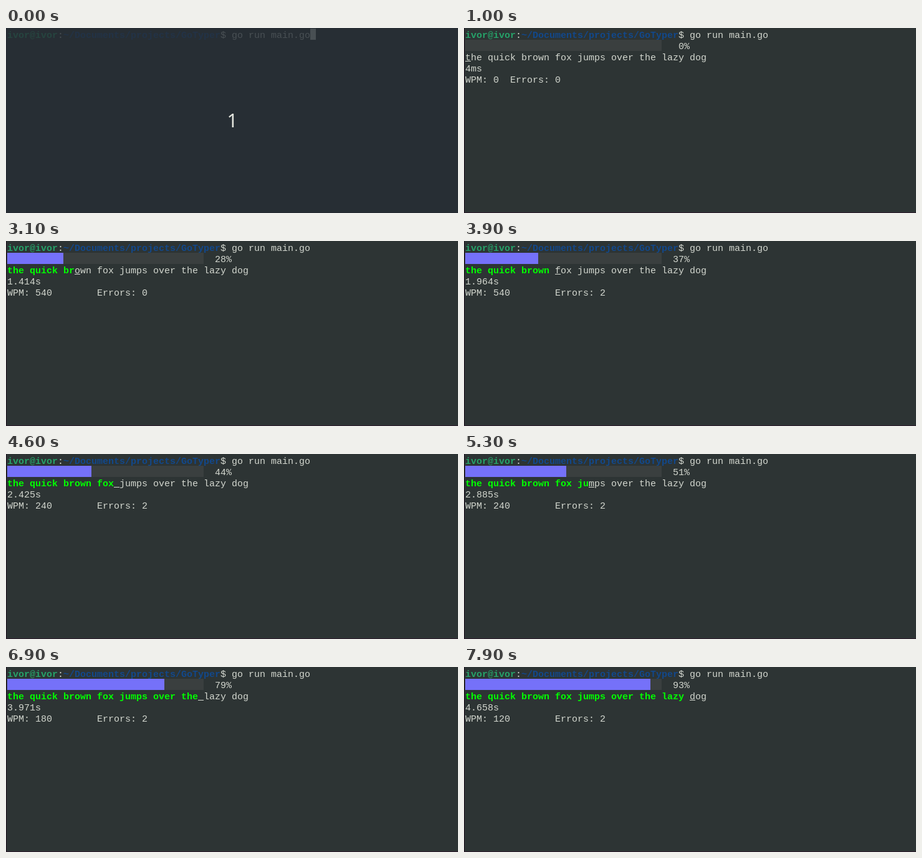
Write an HTML page with a canvas that moves like this. It is 725 px wide and 298 px high and loops after 8000 ms.

```html
<!DOCTYPE html>
<html lang="en">
<head>
<meta charset="utf-8">
<title>Typing test in a terminal</title>
<style>
html, body { margin: 0; width: 100%; height: 100%; overflow: hidden; background: #2d3434; }
canvas { display: block; }
</style>
</head>
<body>
<canvas id="stage" width="725" height="298"></canvas>
<script>
const ctx = document.getElementById('stage').getContext('2d');
const LOOP = 8000, STEP = 100, START = 1000;
const CELL = 9, ROW = 18, BAR = 35;
const FG = '#d3d7cf', BG = '#2d3434';
const PHRASE = 'the quick brown fox jumps over the lazy dog';
const WORDS = PHRASE.split(' ').length;

// [time, value] points, joined by straight lines
const typedKeys = [[1000, 0], [1400, 0], [2000, 4], [3100, 12], [3200, 13], [3600, 13],
  [3900, 16], [5300, 22], [6900, 34], [7900, 40]];
const clockKeys = [[1000, 4], [2000, 674], [3100, 1414], [3900, 1964], [5300, 2885],
  [6900, 3971], [7900, 4658]];

function lerpKeys(keys, t) {
  let i = 1;
  while (i < keys.length - 1 && keys[i][0] < t) i++;
  const [t0, v0] = keys[i - 1], [t1, v1] = keys[i];
  return v0 + (v1 - v0) * (t - t0) / (t1 - t0);
}

const cellX = col => 2 + col * CELL;
const cellY = row => 1 + row * ROW;

function rect(color, x, y, w, h) {
  ctx.fillStyle = color;
  ctx.fillRect(x, y, w, h);
}

function block(color, col, row, count = 1) {
  rect(color, cellX(col), cellY(row), count * CELL, ROW);
}

function print(text, col, row, color = FG, bold = false) {
  ctx.font = `${bold ? 'bold ' : ''}15px "Liberation Mono", monospace`;
  ctx.textAlign = 'left';
  ctx.fillStyle = color;
  [...text].forEach((ch, i) => ctx.fillText(ch, cellX(col + i), cellY(row) + 15));
}

function drawPrompt() {
  print('ivor@ivor', 0, 0, '#26a269', true);
  print(':', 9, 0);
  print('~/Documents/projects/GoTyper', 10, 0, '#12488b', true);
  print('$ go run main.go', 38, 0);
}

function drawTest(t) {
  const typed = Math.floor(lerpKeys(typedKeys, t) + 1e-6);
  const ms = Math.round(lerpKeys(clockKeys, t));
  const done = typed / PHRASE.length;
  const filled = Math.round(done * BAR);

  block('#3a3f3f', 0, 1, BAR);
  block('#7571f9', 0, 1, filled);
  print(`${Math.round(done * 100)}%`.padStart(4), 36, 1);

  print(PHRASE.slice(0, typed), 0, 2, '#00ff00', true);
  print(PHRASE.slice(typed), typed, 2);
  rect(FG, cellX(typed), cellY(2) + 16, CELL, 1);

  print(ms < 1000 ? `${ms}ms` : `${ms / 1000}s`, 0, 3);

  const sec = Math.floor(ms / 1000);
  const wpm = `WPM: ${sec ? Math.floor(WORDS / sec) * 60 : 0}`;
  const errors = (t >= 3300) + (t >= 3500);
  print(wpm, 0, 4);
  print(`Errors: ${errors}`, wpm.length < 8 ? 8 : 16, 4); // tab stop
}

function drawCountdown(t) {
  rect(`rgba(38,45,53,${t ? 0.4 : 0.8})`, 0, 0, 725, 298);
  if (t) return;
  ctx.font = '30px "Noto Sans", sans-serif';
  ctx.textAlign = 'center';
  ctx.fillStyle = '#e4e6de';
  ctx.fillText('1', 363, 160);
}

function draw(now) {
  const t = Math.floor(now % LOOP / STEP) * STEP;
  rect(BG, 0, 0, 725, 298);
  rect('#1f121f', 0, 0, 1, 298);
  rect('#2d1c2c', 0, 297, 725, 1);
  drawPrompt();
  if (t < 500) block(FG, 54, 0);
  else if (t >= 600 && t < START) block(FG, 0, 1);
  if (t >= START) drawTest(t);
  if (t < 200) drawCountdown(t);
}

const begin = performance.now();
function tick() {
  draw(performance.now() - begin);
  requestAnimationFrame(tick);
}
tick();
</script>
</body>
</html>
```
